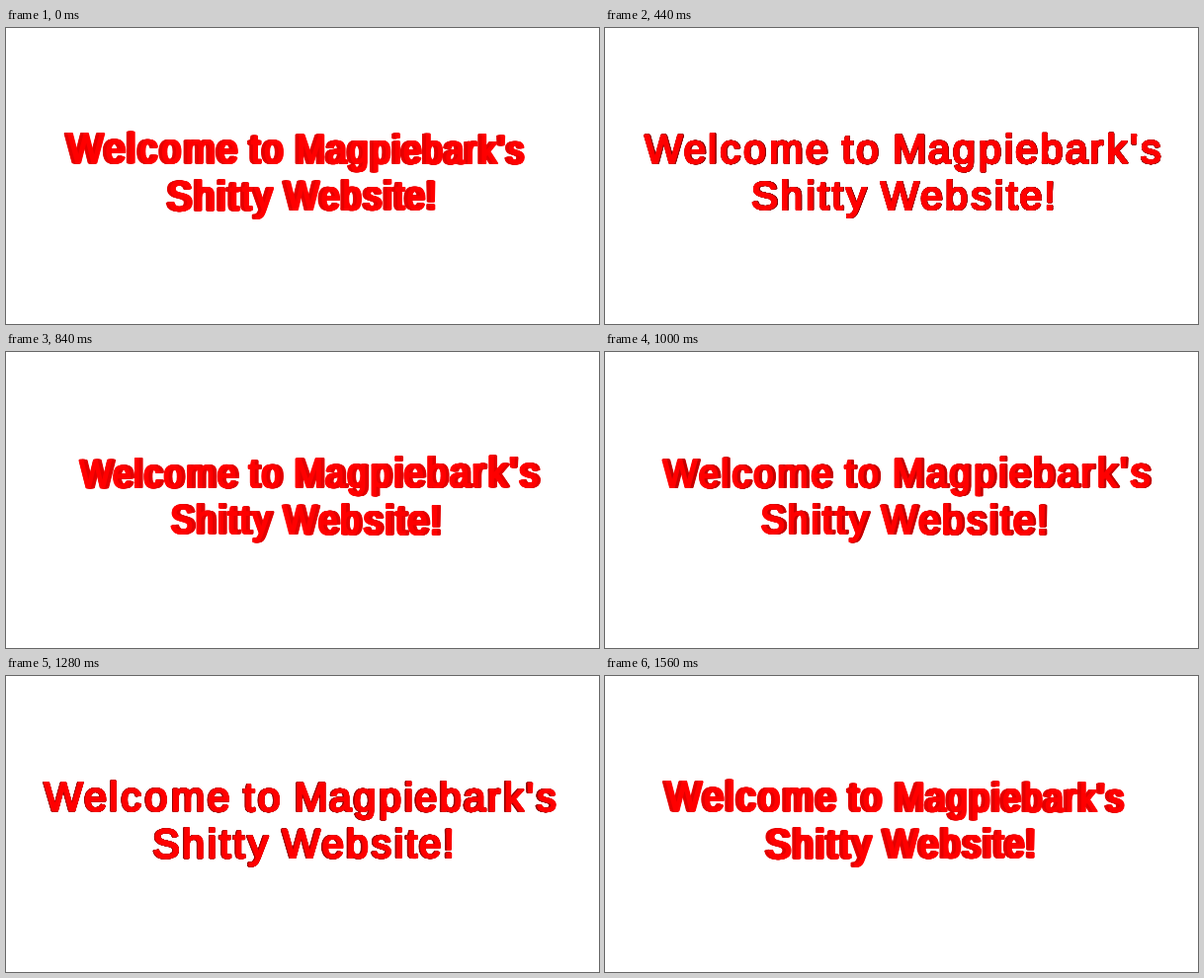
An HTML page with a canvas that plays this animation: 600 px wide and 300 px high, repeating every 1600 ms.

```html
<!DOCTYPE html>
<html lang="en">
<head>
<meta charset="utf-8">
<title>Welcome</title>
<style>
  html, body { margin: 0; width: 100%; height: 100%; overflow: hidden; background: #fff; }
  canvas { display: block; width: 600px; height: 300px; }
</style>
</head>
<body>
<canvas id="stage" width="600" height="300"></canvas>
<script>
const ctx = document.getElementById('stage').getContext('2d');
const FAMILY = '"Liberation Sans", Arial, sans-serif';
const SPACING_FONT = `bold 43px ${FAMILY}`;
const GLYPH_FONT = `41px ${FAMILY}`;
const OUTLINE = 2.1;   // round outline that thickens the glyphs
const LOOP = 1600, STEP = 40;
const SWING = 28.2 * Math.PI / 180;
const EYE = 3600;      // viewer distance
const DEPTH = 8;       // extrusion thickness
const LAYERS = 9;
const MID = 15;        // glyph middle above its baseline

const LINES = [
  { text: "Welcome to Magpiebark's", x: 0.5, y: -13.3 },
  { text: 'Shitty Website!', x: 2, y: 34 }
];

// Split a centred line into glyphs placed on the flat sign.
function layout({ text, x, y }) {
  let pen = x - ctx.measureText(text).width / 2;
  return [...text].map(ch => {
    const w = ctx.measureText(ch).width;
    const glyph = { ch, x: pen + w / 2, y: y - MID };
    pen += w;
    return glyph;
  }).filter(g => g.ch !== ' ');
}

ctx.fontKerning = 'none';
ctx.font = SPACING_FONT;
const glyphs = LINES.flatMap(layout);

ctx.font = GLYPH_FONT;
ctx.textAlign = 'center';
ctx.lineJoin = 'round';
ctx.lineWidth = OUTLINE;

// Perspective, linearised around the middle of each glyph.
function drawGlyph(g, z, sin, cos) {
  const px = g.x * cos + z * sin;
  const pz = z * cos - g.x * sin;
  const f = EYE / (EYE - pz);
  const slope = -f * f * sin / EYE;
  ctx.setTransform(f * cos + px * slope, g.y * slope, 0, f, 300 + px * f, 150 + g.y * f);
  ctx.fillText(g.ch, 0, MID);
  ctx.strokeText(g.ch, 0, MID);
}

function draw(time) {
  const t = Math.floor((time % LOOP) / STEP) * STEP;
  const angle = SWING * Math.cos(2 * Math.PI * t / LOOP);
  const sin = Math.sin(angle), cos = Math.cos(angle);
  const side = Math.round(120 + 230 * Math.abs(sin));

  ctx.setTransform(1, 0, 0, 1, 0, 0);
  ctx.fillStyle = '#fff';
  ctx.fillRect(0, 0, 600, 300);
  for (let i = 0; i <= LAYERS; i++) {
    ctx.fillStyle = ctx.strokeStyle = i < LAYERS ? `rgb(${side}, 0, 0)` : '#f00';
    const z = DEPTH * (i / LAYERS - 0.5);
    for (const g of glyphs) drawGlyph(g, z, sin, cos);
  }
}

const start = performance.now();
function tick() {
  draw(performance.now() - start);
  requestAnimationFrame(tick);
}
tick();
</script>
</body>
</html>
```
